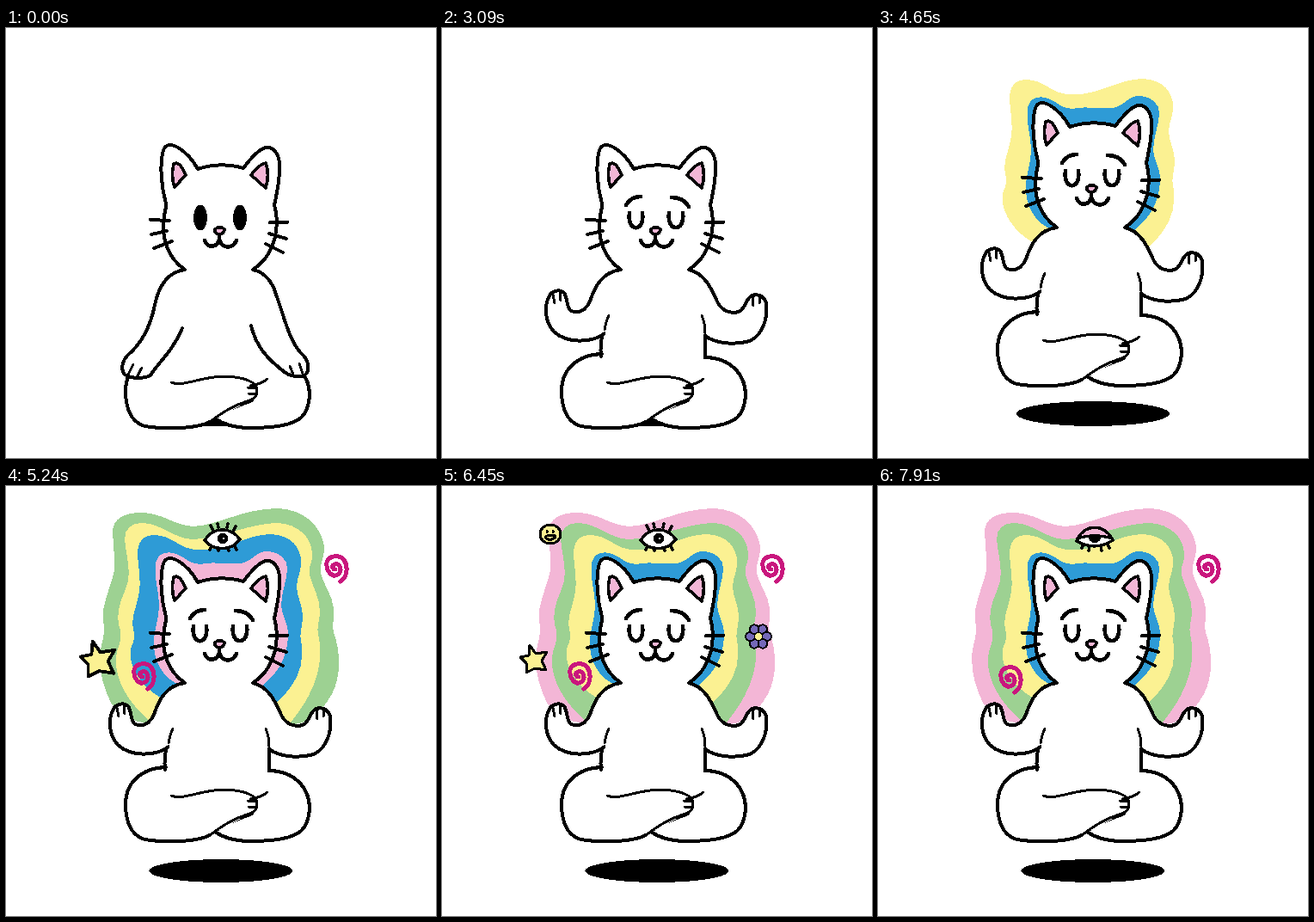
Animation of 500x500 px, one loop 8 s. Source, as an HTML page without scripts:

```html
<!DOCTYPE html>
<html lang="en">
<head>
<meta charset="utf-8">
<title>Meditating cat</title>
<style>
  html, body { margin: 0; width: 100%; height: 100%; overflow: hidden; background: #fff; }
  svg { display: block; width: 100vw; height: 100vh; }
  svg * { animation: 8s step-end infinite; }

  .line { fill: none; stroke: #000; stroke-width: 4; stroke-linecap: round; stroke-linejoin: round; }
  .skin { fill: #fff; }
  .thin { stroke-width: 3; }
  .bold { stroke-width: 4.6; }
  .pink { fill: #f3b6d6; }
  .gold { fill: #fbf192; }
  .swirl { stroke: #c9167d; stroke-width: 5; }

  .cat { animation-name: rise; }
  .shadow { animation-name: shrink; }
  .awake { animation-name: awake; }
  .asleep { animation-name: asleep; }
  .down { animation-name: down; }
  .mid { animation-name: mid; }
  .up { animation-name: up; }

  @keyframes rise {
    0%, 38.625% { transform: none; animation-timing-function: steps(52); }
    59.25%, 100% { transform: translateY(-52px); }
  }
  @keyframes shrink {
    0% { rx: 89px; ry: 14.5px; cy: 448.5px; }
    58.875%, 100% { rx: 83.5px; ry: 13.5px; cy: 447.5px; }
  }
  @keyframes awake { 0%, 7% { opacity: 1; } 5.375%, 17.875%, 100% { opacity: 0; } }
  @keyframes asleep { 0%, 7% { opacity: 0; } 5.375%, 17.875%, 100% { opacity: 1; } }
  @keyframes down { 0% { opacity: 1; } 25.75%, 100% { opacity: 0; } }
  @keyframes mid { 0%, 27%, 100% { opacity: 0; } 25.75% { opacity: 1; } }
  @keyframes up { 0% { opacity: 0; } 27%, 100% { opacity: 1; } }

  /* aura: rings appear one by one, then colours travel outward */
  .aura { --b: #2e9bd6; --y: #fbf192; --g: #9dd192; --p: #f3b6d6; animation-name: hue; }
  .r1 { fill: var(--c1); animation-name: ring1; }
  .r2 { fill: var(--c2); animation-name: ring2; }
  .r3 { fill: var(--c3); animation-name: ring3; }
  .r4 { fill: var(--c4); animation-name: ring4; }
  @keyframes hue {
    0%, 70.25%, 79.25%, 88.25%, 97.25%, 100% { --c1: var(--b); --c2: var(--y); --c3: var(--g); --c4: var(--p); }
    63.5%, 72.5%, 81.5%, 90.5% { --c1: var(--p); --c2: var(--b); --c3: var(--y); --c4: var(--g); }
    65.75%, 74.75%, 83.75%, 92.75% { --c1: var(--g); --c2: var(--p); --c3: var(--b); --c4: var(--y); }
    68%, 77%, 86%, 95% { --c1: var(--y); --c2: var(--g); --c3: var(--p); --c4: var(--b); }
  }
  @keyframes ring1 { 0% { opacity: 0; } 55.5%, 100% { opacity: 1; } }
  @keyframes ring2 { 0% { opacity: 0; } 57.375%, 100% { opacity: 1; } }
  @keyframes ring3 { 0% { opacity: 0; } 59.25%, 100% { opacity: 1; } }
  @keyframes ring4 { 0% { opacity: 0; } 61.375%, 100% { opacity: 1; } }

  /* charms */
  .charms { animation-name: charms; }
  .near, .far { transform-box: fill-box; transform-origin: center; animation-delay: var(--d, 0s); }
  .near { animation-name: near; }
  .far { animation-name: far; }
  .lid { animation-name: lid; }
  .iris { animation-name: iris; }
  .sway { animation-name: sway; }
  @keyframes charms { 0% { opacity: 0; } 63.5%, 100% { opacity: 1; } }
  @keyframes near {
    0%, 81.75%, 97%, 100% { opacity: 0; transform: none; }
    65%, 85.125% { opacity: 1; transform: scale(1.28); }
    66%, 86% { opacity: 1; transform: none; }
  }
  @keyframes far {
    0%, 74.625%, 94.5%, 100% { opacity: 0; transform: none; }
    69.5%, 88.25% { opacity: 1; transform: scale(1.2); }
    70.5%, 89.25% { opacity: 1; transform: none; }
  }
  @keyframes lid { 0%, 74.75%, 83.75%, 100% { opacity: 0; } 72.5%, 81.5%, 95% { opacity: 1; } }
  @keyframes iris { 0%, 74.75%, 83.75% { opacity: 1; } 72.5%, 81.5%, 95%, 100% { opacity: 0; } }
  @keyframes sway {
    0%, 74.75%, 83.75% { transform: translate(6px, -4px); }
    72.5%, 81.5%, 95%, 100% { transform: none; }
  }
</style>
</head>
<body>
<svg viewBox="0 0 500 500" shape-rendering="crispEdges">
  <defs>
    <path id="swirl" class="line swirl" d="M159 240C167 235 168 222 163 215C157 208 145 210 143 218C142 228 149 236 156 232C162 227 158 218 152 220C148 222 150 226 153 226"/>
    <ellipse id="petal" cx="368" cy="165.500" rx="5.200" ry="5.500" fill="#7468b8" stroke="#000" stroke-width="2"/>
  </defs>

  <ellipse class="shadow" cx="250" cy="448.500" rx="89" ry="14.500"/>

  <g class="cat">
    <g class="aura" transform="translate(0 52)">
      <path class="r4" d="M124 54C124 37 138 32 154 31C182 30 194 46 218 47C246 46 276 26 316 26C346 27 366 46 370 70C371 82 364 92 366 102C370 116 379 126 381 142C382 152 379 160 381 170C390 196 389 222 379 242C366 264 352 276 334 277L250 300L168 277C145 274 130 264 122 252C112 232 107 210 110 190C112 180 115 172 114 162C109 146 118 126 123 110C130 92 124 72 124 54Z"/>
      <path class="r3" d="M138 62C138 49 146 43 158 43C180 43 194 61 217 62C250 61 284 43 316 43C340 44 355 60 356 78C357 88 351 94 353 104C357 118 365 130 365 146C365 156 361 162 363 172C370 203 362 238 330 276L250 300L168 274C140 250 126 224 128 198C130 186 135 180 133 168C126 150 134 132 139 120C147 102 140 84 138 62Z"/>
      <path class="r2" d="M153 75C154 62 162 57 172 57C194 57 202 74 222 74C254 77 280 56 308 56C332 57 343 72 343 88C344 98 338 106 338 118C339 130 345 140 345 152C345 162 341 170 343 180C348 206 340 228 317 250L250 280L183 248C156 234 142 208 145 190C147 182 150 180 149 171C144 154 151 144 153 132C159 112 153 96 153 75Z"/>
      <path class="r1" d="M174 90C176 78 187 75 198 79C210 84 214 91 226 91C244 87 256 92 274 90C288 86 292 75 306 76C320 78 328 86 327 98C326 112 320 124 320 140C322 154 329 162 328 174C327 200 316 218 298 232L250 250L203 232C184 224 174 208 172 188C170 172 178 156 178 140C178 122 172 108 174 90Z"/>
    </g>

    <path class="skin" d="M208 279H287L306 340V415H188V340Z"/>
    <path class="line skin" d="M306 383C334 383 353 402 353 427C352 440 349 448 343 453C332 463 306 465 284 465C266 465 253 461 243 454"/>
    <path class="line skin" d="M186 379C157 380 139 397 139 422C139 446 148 463 168 464C192 467 218 465 233 460C240 456 246 450 258 444L286 433"/>
    <path class="skin" d="M188 381L192 412C205 416 225 404 255 405C280 406 292 413 292 421C292 430 288 432 284 433L240 456L200 460L150 440Z"/>
    <path class="line thin" d="M192 412C206 418 226 405 255 405C278 406 292 412 292 421C292 430 287 432 280 434C262 440 248 449 236 459M284 416C292 415 298 413 304 408M281 418L290 419M282 425H290"/>

    <g class="line skin">
      <g class="down">
        <path d="M208 281C186 284 177 303 173 322C167 352 155 369 142 380C135 387 133 397 138 403C146 408 160 408 168 404C176 390 194 376 205 349"/>
        <path d="M287 281C302 284 311 298 314 310C324 336 329 366 346 381C354 390 353 403 344 405C334 406 326 403 320 397C304 384 291 371 285 346"/>
        <path class="thin" d="M148 391L142 403M158 395L152 406M330 393L334 403M341 390L345 402"/>
      </g>
      <g class="mid">
        <path d="M208 281C186 284 178 303 172 322C164 338 148 342 134 346C122 350 119 364 125 373C136 382 174 378 196 346"/>
        <path d="M287 281C302 284 311 298 316 312C326 334 346 342 364 347C376 352 379 364 374 374C362 384 324 380 302 346"/>
        <path class="thin" d="M122 358L132 361M124 367L132 368M376 358L366 361M374 367L366 368"/>
      </g>
      <g class="up">
        <path d="M208 281C186 284 178 300 172 318C166 330 158 332 150 329C145 326 146 314 142 308C137 303 128 306 125 311C118 324 120 342 130 353C146 368 176 366 191 354"/>
        <path d="M287 281C304 285 312 300 319 316C324 328 334 333 345 330C352 327 353 318 357 314C362 308 374 309 377 320C379 336 374 356 358 364C340 369 318 367 306 358"/>
        <path stroke="none" d="M208 281H287L305 357L304 380H188L190 352Z"/>
        <path class="thin" fill="none" d="M194 334C191 340 190 346 189 351M302 334C305 341 306 348 306 355M129 310L131 320M137 306L138 317M361 313L362 323M369 311V320"/>
        <path fill="none" d="M187 356C184 365 184 373 185 382M306 357C307 366 306 374 306 382"/>
      </g>
    </g>

    <path class="line skin" d="M208 281C189 268 180 246 184 220C184 213 187 210 186 204C181 186 178 160 183 142C186 134 194 135 200 139C210 145 217 153 223 164C240 158 260 158 276 163C284 152 291 144 299 140C309 136 317 144 318 158C319 176 315 192 312 206C318 226 316 262 287 281"/>
    <path class="line pink" style="stroke-width:3.600" d="M195 158C200 155 204 160 209 171L196 185C193 176 193 166 195 158ZM302 157C305 165 305 176 302 186L285 171C290 164 296 158 302 157Z"/>
    <path class="line" stroke-linecap="butt" d="M168 223L190 224M169 240L187 236M172 256L193 248M307 226H327M306 239L326 245M302 251L322 261"/>
    <path class="line bold" d="M231 247C235 257 246 255 248 246C251 256 263 258 268 247M248 246V240"/>
    <path class="line pink" style="stroke-width:3.600" d="M243 234C246 231 251 231 254 234C254 239 250 240 247 240C244 239 242 237 243 234Z"/>
    <g class="awake">
      <ellipse cx="226" cy="220.500" rx="8" ry="15"/>
      <ellipse cx="272" cy="220.500" rx="8" ry="15"/>
    </g>
    <path class="line bold asleep" d="M218 215C215 238 236 238 233 215M264 215C261 238 283 238 280 215M214 206C218 199 224 196 231 196M267 197C277 197 283 201 287 208"/>
  </g>

  <g class="charms">
    <use class="sway" href="#swirl"/>
    <use href="#swirl" transform="translate(230 -129)"/>

    <g class="line" style="stroke-width:3.400">
      <g class="iris">
        <path class="skin" d="M231 63C241 47 261 47 272 62C262 76 241 76 231 63Z"/>
        <circle cx="252" cy="61" r="4.500" fill="#000"/>
        <path d="M240 50L238 46M247 48L246 44M257 48L258 44M265 51L267 47M239 70L237 74M247 72V75M258 72L259 75M266 70L268 74"/>
        <circle cx="253" cy="61" r="1" fill="#fff" stroke="none"/>
      </g>
      <g class="lid">
        <path class="skin" d="M231 64C241 44 263 44 273 63C260 72 244 72 231 64Z"/>
        <path class="pink" d="M232 61C242 44 262 44 272 61C260 57 244 57 232 61Z"/>
        <path fill="#000" d="M246 59H258C257 66 247 66 246 59Z"/>
        <path d="M239 68L237 72M246 70L245 75M259 70L260 75M267 68L269 72"/>
      </g>
    </g>

    <path class="near line thin gold" d="M102 185L109 195L122 193L116 203L121 214L108 212L98 217V206L91 199L101 197Z"/>
    <g class="near line thin" style="--d:.07s">
      <ellipse class="gold" cx="126" cy="56" rx="12" ry="11"/>
      <path d="M122 52V54M129 52V54M120 59C122 57 130 57 132 58C131 63 122 64 120 59Z"/>
    </g>
    <g class="near" style="--d:.11s">
      <g transform="rotate(30 368 175)">
        <use href="#petal"/>
        <use href="#petal" transform="rotate(60 368 175)"/>
        <use href="#petal" transform="rotate(120 368 175)"/>
        <use href="#petal" transform="rotate(180 368 175)"/>
        <use href="#petal" transform="rotate(240 368 175)"/>
        <use href="#petal" transform="rotate(300 368 175)"/>
      </g>
      <circle class="gold" cx="368" cy="175" r="4.500" stroke="#000" stroke-width="1.500"/>
    </g>

    <path class="far line thin gold" d="M338 220C356 220 359 244 341 245C332 246 326 241 326 235C338 239 344 229 338 220Z"/>
    <g class="far" style="--d:.09s">
      <circle class="line thin pink" cx="129" cy="138" r="15.500"/>
      <path d="M129 122A16 16 0 0 0 129 154A8 8 0 0 0 129 138A8 8 0 0 1 129 122Z" transform="rotate(-25 129 138)"/>
      <circle cx="126" cy="131" r="2.500"/>
      <circle class="pink" cx="131" cy="145" r="3"/>
    </g>
    <g class="far" style="--d:.18s">
      <g class="line thin" style="stroke:#2e9bd6" transform="rotate(10 352 49)">
        <circle class="skin" cx="352" cy="49" r="15"/>
        <path d="M352 34V64M352 49L341 59M352 49L363 59"/>
      </g>
    </g>
  </g>
</svg>
</body>
</html>
```
